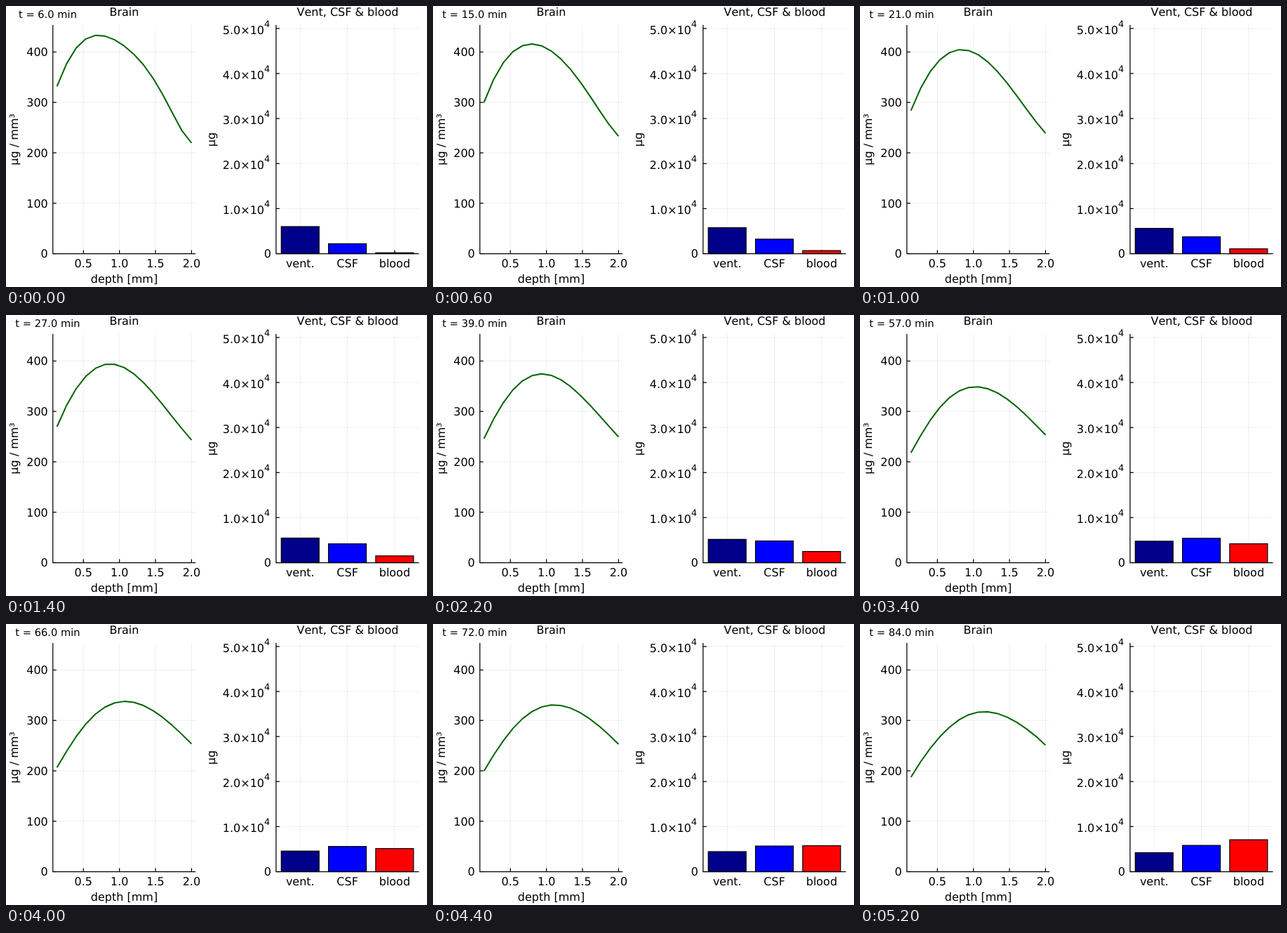
An HTML page for the animation above (5400 ms loop, 600 by 400 pixels).

```html
<!DOCTYPE html>
<html lang="en">
<head>
<meta charset="utf-8">
<title>Brain, ventricle, CSF and blood</title>
<style>
  html, body { margin: 0; width: 100%; height: 100%; overflow: hidden; background: #fff; }
  svg { display: block; width: 600px; height: 400px; }
  text { font: 16px "DejaVu Sans", sans-serif; font-kerning: none; text-rendering: geometricPrecision; white-space: pre; }
  .mid { text-anchor: middle; }
  .end { text-anchor: end; }
  #clock { font-size: 14.67px; }
  .sup { font-size: 12.8px; }
  .grid { stroke: #000; stroke-opacity: .1; stroke-width: .67; }
  .axis { stroke: #000; stroke-width: 1.25; fill: none; }
  #curve { fill: none; stroke: #006400; stroke-width: 2; stroke-linejoin: round; }
  .bar { stroke: #000; stroke-width: 1.25; }
</style>
</head>
<body>
<svg id="stage" viewBox="0 0 600 400">
  <text class="mid" x="168.4" y="14">Brain</text>
  <text class="mid" x="487" y="14">Vent, CSF &amp; blood</text>
  <text class="mid" x="168.5" y="393.5">depth [mm]</text>
  <text class="mid" transform="translate(16.6 190) rotate(-90)">µg / mm³</text>
  <text class="mid" transform="translate(298.2 190) rotate(-90)">µg</text>
  <text class="mid" id="clock" x="59.5" y="17"></text>
</svg>
<script>
const stage = document.getElementById('stage');
const clock = document.getElementById('clock');
const BASE = 352.5, TOP = 27;
const depthX = d => 58.95 + d * 102.73;
const brainY = v => BASE - v * .7175;

function add(tag, attrs, text) {
  const el = document.createElementNS('http://www.w3.org/2000/svg', tag);
  for (const k in attrs) el.setAttribute(k, attrs[k]);
  if (text) el.textContent = text;
  return stage.appendChild(el);
}
const path = (cls, d) => add('path', { class: cls, d });

function plot(left, right, xTicks, yTicks) {
  for (const [x, label] of xTicks) {
    path('grid', `M${x} ${BASE}V${TOP}`);
    path('axis', `M${x} ${BASE}v-5`);
    add('text', { class: 'mid', x, y: 372 }, label);
  }
  for (const [y, label, power] of yTicks) {
    path('grid', `M${left} ${y}H${right}`);
    path('axis', `M${left} ${y}h5`);
    add('text', { class: 'end', x: power ? 368 : left - 7, y: y + (power ? 7.7 : 5.8) }, label);
    if (power) add('text', { class: 'sup', x: 368, y: y - 2.2 }, power);
  }
  path('axis', `M${left} ${TOP}V${BASE}H${right}`);
}

plot(66.8, 270.2,
  [.5, 1, 1.5, 2].map(d => [depthX(d), d.toFixed(1)]),
  [0, 100, 200, 300, 400].map(v => [brainY(v), String(v)]));
plot(384.9, 588.5,
  ['vent.', 'CSF', 'blood'].map((s, i) => [419.3 + i * 67.3, s]),
  [0, 1, 2, 3, 4, 5].map(v => [BASE - v * 64.1, v ? v + '.0×10' : '0', v ? '4' : '']));

const curve = add('path', { id: 'curve' });
const bars = ['#00008b', '#00f', '#f00'].map((fill, i) =>
  add('rect', { class: 'bar', x: 392.3 + i * 67.3, width: 53.9, fill }));

// Lagrange polynomial through (xs, ys).
const through = (xs, ys, x) => xs.reduce((sum, a, i) =>
  sum + xs.reduce((p, b, j) => i === j ? p : p * (x - b) / (a - b), ys[i]), 0);

// Concentration at a few depths (in 15ths of 2 mm) and times; diffusion runs with the root of time.
const depths = [1, 3, 5, 8, 11, 13, 15];
const roots = [6, 15, 39, 84].map(Math.sqrt);
const profiles = [
  [332, 408, 433, 412, 348, 279.5, 219.5],
  [300, 378.5, 412.5, 402, 341, 284.5, 233],
  [246, 317, 360.5, 371.5, 332.5, 292, 249.5],
  [187.5, 244.5, 286.5, 316.5, 306.5, 283.5, 251]
];

// Bar heights in pixels: decay, saturation, accumulation.
const heights = [
  n => 38.5 * Math.exp(-.0137 * n),
  n => 39.2 - 25.1 * Math.exp(-n / 10),
  n => 1.2 + .92 * n + .043 * n ** 2 - .0005 * n ** 3
];

function draw(n) {
  const minutes = 6 + 3 * n;
  clock.textContent = `t = ${minutes.toFixed(1)} min`;

  const now = depths.map((_, i) => through(roots, profiles.map(p => p[i]), Math.sqrt(minutes)));
  const points = Array.from({ length: 15 }, (_, k) =>
    `${depthX((k + 1) * 2 / 15)} ${brainY(through(depths, now, k + 1))}`);
  curve.setAttribute('d', 'M' + points.join('L'));

  bars.forEach((bar, i) => {
    const h = heights[i](n);
    bar.setAttribute('y', BASE - h);
    bar.setAttribute('height', h);
  });
}

const start = performance.now();
let shown = -1;
function tick() {
  const n = Math.floor((performance.now() - start) % 5400 / 200);
  if (n !== shown) draw(shown = n);
  requestAnimationFrame(tick);
}
tick();
</script>
</body>
</html>
```
